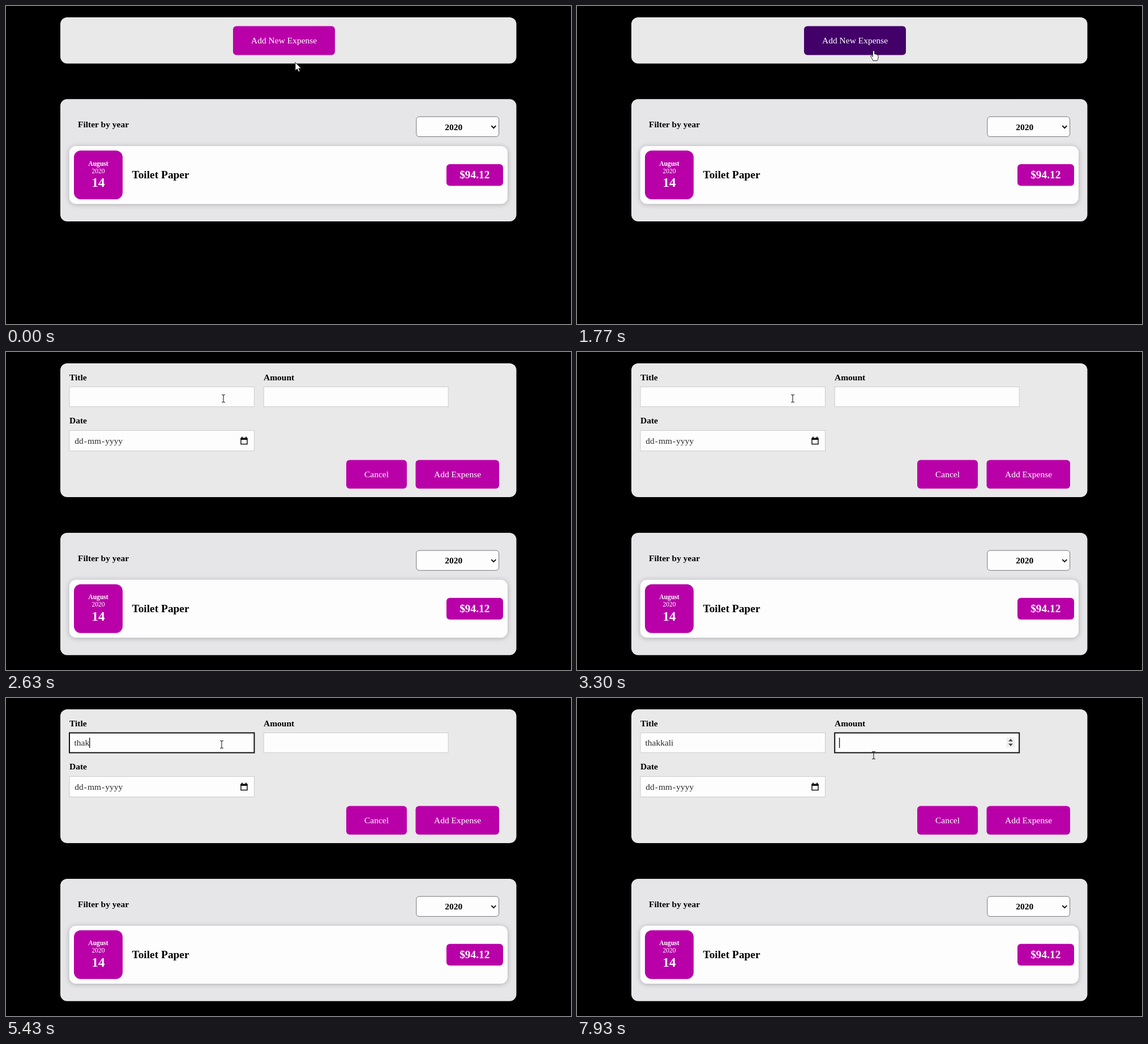
An HTML page for the animation above (8000 ms loop, 998 by 561 pixels).

```html
<!DOCTYPE html>
<html lang="en">
<head>
<meta charset="utf-8">
<title>Expense form</title>
<style>
html, body { margin: 0; height: 100%; overflow: hidden; background: #000; }
svg { display: block; width: 998px; height: 561px; font: 15.5px "Liberation Serif", "Times New Roman", serif; }
text { white-space: pre; }
.bold { font-weight: bold; }
.light, .btn text { fill: #fff; }
.mid { text-anchor: middle; }
.big { font-size: 19.4px; }
.small { font-size: 11.6px; }
.tile, .btn rect { fill: #b900a8; }
.btn.hover rect { fill: #420068; }
.field { fill: #fdfdfd; stroke: #ccc; }
.field.focus { stroke: #101010; stroke-width: 2; }
.caret { stroke: #111; stroke-width: 1.4; }
.entry { fill: #2c2c2c; }
#card { filter: drop-shadow(0 1px 4px rgba(0, 0, 0, .25)); }
#arrow, #hand { fill: #fff; stroke: #222; stroke-width: 1; stroke-linejoin: round; }
#beam { fill: none; stroke: #222; stroke-width: 1.1; }
</style>
</head>
<body>
<svg viewBox="0 0 998 561">
  <rect id="panel" x="96" y="20" width="805.5" height="81.5" rx="12" fill="#e9e9e9"/>

  <g id="opener" class="btn">
    <rect x="401" y="35.5" width="180" height="51" rx="6"/>
    <text x="433" y="66">Add New Expense</text>
  </g>

  <g id="form">
    <g class="bold">
      <text x="112" y="50">Title</text>
      <text x="455" y="50">Amount</text>
      <text x="112" y="126">Date</text>
    </g>
    <rect id="title" class="field" x="112" y="61.5" width="326.5" height="35"/>
    <rect id="amount" class="field" x="455.2" y="61.5" width="326" height="35"/>
    <rect class="field" x="112" y="138.5" width="326.5" height="36"/>
    <text id="typed" class="entry" x="120.5" y="84"></text>
    <g class="entry">
      <text x="121.3" y="162">dd</text>
      <text x="137.8" y="162">-</text>
      <text x="144" y="162">mm</text>
      <text x="169" y="162">-</text>
      <text x="175.3" y="162">yyyy</text>
    </g>
    <path d="M415 152.5h11v10h-11z" fill="none" stroke="#111" stroke-width="1.5"/>
    <path d="M414.5 151.5h12v3.5h-12zM416 149.5h2v2h-2zM423 149.5h2v2h-2z" fill="#111"/>
    <g id="spinner">
      <rect x="758.5" y="69.5" width="15" height="18" fill="#efefef"/>
      <path d="M762 76.5l4-4.5 4 4.5zM762 80.5l4 4.5 4-4.5z" fill="#444"/>
    </g>
    <path id="caret" class="caret" d="M0 70v18"/>
    <g class="btn">
      <rect x="601" y="190.5" width="107" height="50.5" rx="6"/>
      <text x="633" y="221">Cancel</text>
      <rect x="723.5" y="190.5" width="147.5" height="50.5" rx="6"/>
      <text x="756" y="221">Add Expense</text>
    </g>
  </g>

  <g id="list">
    <rect x="96" y="164.3" width="805.5" height="215.7" rx="12" fill="#e6e6e8"/>
    <text class="bold" x="127" y="214">Filter by year</text>
    <rect x="724.8" y="195.3" width="145.8" height="35.2" rx="5" fill="#fdfdfd" stroke="#777"/>
    <text class="bold mid" x="790.8" y="218.5">2020</text>
    <path d="M857.3 211.3l4 4 4-4" fill="none" stroke="#111" stroke-width="2"/>
    <rect id="card" x="111.7" y="247" width="774.3" height="102.3" rx="12" fill="#fdfdfd"/>
    <rect class="tile" x="120" y="255" width="86" height="86" rx="12"/>
    <g class="light mid">
      <text class="small bold" x="163" y="281.5">August</text>
      <text class="small" x="163" y="294.5">2020</text>
      <text class="bold" x="163" y="319" font-size="23.2">14</text>
    </g>
    <text class="bold big" x="222.5" y="304">Toilet Paper</text>
    <rect class="tile" x="778" y="279" width="100" height="38.3" rx="6"/>
    <text class="bold big light mid" x="827.8" y="304">$94.12</text>
  </g>

  <g id="cursor">
    <path id="arrow" d="M0 0v14.5l3.4-3.1 2.3 5.2 2.4-1-2.3-5.1h4.6z"/>
    <path id="hand" d="M-1.6 1.4Q0-1 1.6 1.4V6.3Q3 5.3 4 7Q5.5 6.2 6.3 7.8Q8 7.3 8 9.5V12.5Q8 15 6.3 18H-1Q-2 15-5 10.8Q-5.5 8.5-3.2 9.3L-1.6 11Z"/>
    <path id="beam" d="M-3-6.5h2l1 1 1-1h2M0-5.5v11M-3 6.5h2l1-1 1 1h2"/>
  </g>
</svg>
<script>
const LOOP = 8000, OPEN = 1800, FOCUS_TITLE = 3400, FOCUS_AMOUNT = 7300;
const WORD = "thakkali";
const KEYS = [5030, 5130, 5230, 5340, 5440, 5770, 5970, 6270];
// Mouse path: time, x, y
const PATH = [
  [150, 511, 99.5], [900, 524, 78.5], [1799, 524, 78.5], [OPEN, 526, 85],
  [1900, 526, 85], [2700, 381, 82], [6530, 381, 82], [6770, 488, 101],
  [7000, 488, 101], [7030, 524, 101]
];
const $ = id => document.getElementById(id);
const show = (id, on) => $(id).style.display = on ? "" : "none";

function mouseAt(t) {
  const i = PATH.findIndex(p => p[0] > t);
  if (i === 0) return PATH[0].slice(1);
  if (i < 0) return PATH[PATH.length - 1].slice(1);
  const [t0, x0, y0] = PATH[i - 1], [t1, x1, y1] = PATH[i];
  const u = (t - t0) / (t1 - t0), e = u * u * (3 - 2 * u);
  return [x0 + (x1 - x0) * e, y0 + (y1 - y0) * e];
}

function draw(t) {
  const open = t >= OPEN, inAmount = t >= FOCUS_AMOUNT;
  const inTitle = t >= FOCUS_TITLE && !inAmount;
  const [x, y] = mouseAt(t);
  const hover = !open && y < 86.5;

  show("form", open);
  show("opener", !open);
  $("opener").classList.toggle("hover", hover);
  $("panel").setAttribute("height", open ? 236 : 81.5);
  $("list").setAttribute("transform", `translate(0 ${open ? 154.8 : 0})`);

  const count = KEYS.filter(k => k <= t).length;
  $("typed").textContent = WORD.slice(0, count);
  $("title").classList.toggle("focus", inTitle);
  $("amount").classList.toggle("focus", inAmount);
  show("spinner", inAmount || (x > 455 && y < 97));

  // The caret restarts its blink with every key
  const since = t - (count ? KEYS[count - 1] : FOCUS_TITLE);
  show("caret", inAmount || (inTitle && since % 1000 < 500));
  const end = count ? $("typed").getComputedTextLength() : 0;
  $("caret").setAttribute("transform", `translate(${inAmount ? 463.6 : 121 + end} 0)`);

  show("arrow", !open && !hover);
  show("hand", hover);
  show("beam", open);
  $("cursor").setAttribute("transform", `translate(${x} ${y})`);
}

const start = performance.now();
function tick() {
  draw((performance.now() - start) % LOOP);
  requestAnimationFrame(tick);
}
tick();
</script>
</body>
</html>
```
